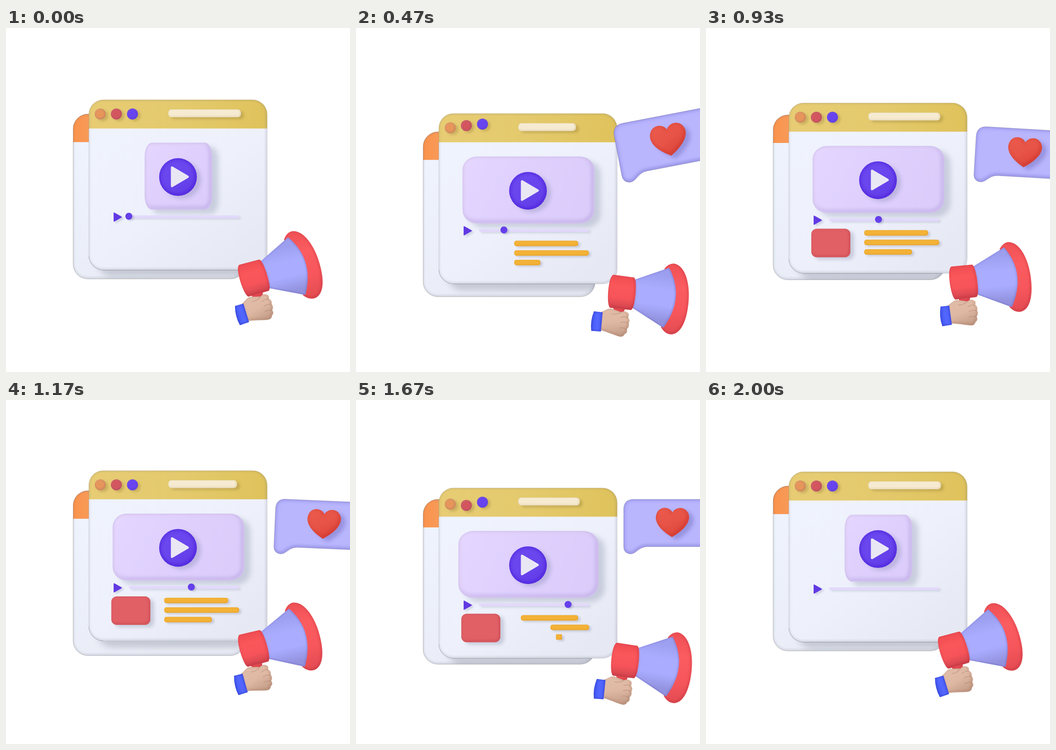
Recreate the animation shown at these times as an HTML page with a canvas. Size 748 by 748 pixels, loop 2030 ms.

```html
<!DOCTYPE html>
<html lang="en">
<head>
<meta charset="utf-8">
<style>
html, body { margin: 0; width: 100%; height: 100%; overflow: hidden; background: #fff; }
canvas { display: block; }
</style>
</head>
<body>
<canvas id="stage" width="748" height="748"></canvas>
<script>
const ctx = document.getElementById('stage').getContext('2d');
const LOOP = 2030, MOVE = 2000, FAR = 3000, { PI, sin, cos, exp, min, max } = Math;

// Motion rules
const progress = (t, from, to) => min(1, max(0, (t - from) / (to - from)));
const ramp = (t, from, to) => { const u = progress(t, from, to); return u * u * (3 - 2 * u); };
const settle = (t, from, to) => 1 - (1 - progress(t, from, to)) ** 3;
const hop = (t, start, length) => sin(PI * progress(t, start, start + length));
const spring = t => 1 - exp(-t / 165) * cos(PI * t / 320);
const bob = (t, mid, reach, lag = 0) => mid - reach * cos(2 * PI * (t - lag) / 1000);

// Key poses of the waving hand: time, x, y, angle in degrees
const wave = [
  [0, 583, 567.5, -18.5], [270, 607.5, 608, 0], [670, 608, 610, 3], [930, 600, 583, -9.2],
  [1130, 583, 566, -17], [1370, 586, 570, -11.5], [1670, 616.5, 606, 4.6], [2000, 583, 567.5, -18.5]
];

// Smooth path through the poses; returns x, y and angle.
function poseAt(t) {
  const i = max(0, wave.findIndex(p => p[0] >= t) - 1), a = wave[i], b = wave[i + 1];
  const span = b[0] - a[0], u = (t - a[0]) / span, v = 1 - u;
  const speed = (j, k) => {
    const p = wave[j - 1], n = wave[j + 1];
    return p && n ? (n[k] - p[k]) / (n[0] - p[0]) : 0;
  };
  return [1, 2, 3].map(k => a[k] * (1 + 2 * u) * v * v + b[k] * u * u * (3 - 2 * u)
    + span * u * v * (v * speed(i, k) - u * speed(i + 1, k)));
}

// Drawing helpers
function box(x, y, w, h, r) {
  const p = new Path2D();
  p.roundRect(x, y, w, h, r);
  return p;
}
function disc(x, y, r) {
  const p = new Path2D();
  p.arc(x, y, r, 0, 7);
  return p;
}
function blend(x0, y0, x1, y1, ...colors) {
  const g = ctx.createLinearGradient(x0, y0, x1, y1);
  colors.forEach((c, i) => g.addColorStop(i / (colors.length - 1), c));
  return g;
}
function group(draw) {
  ctx.save();
  draw();
  ctx.restore();
}
function shade(color, blur, dx, dy) {
  ctx.shadowColor = color;
  ctx.shadowBlur = blur;
  ctx.shadowOffsetX = dx;
  ctx.shadowOffsetY = dy;
}
function outline(path, color, width = .8) {
  ctx.lineWidth = width;
  ctx.strokeStyle = color;
  ctx.stroke(path);
}

// Soft edge inside a shape: only the shadow of an off-stage outline is seen.
function rim(path, color, size, shift) {
  group(() => {
    ctx.clip(path);
    const m = ctx.getTransform();
    m.e -= FAR;
    ctx.setTransform(m);
    shade(color, size * 1.6, FAR + shift, shift);
    outline(path, '#000', size);
  });
}
function solid(path, fill, { drop = 0, depth = 3, dark = 'rgba(60,40,110,.28)', light = 'rgba(255,255,255,.4)', cast = 'rgba(95,105,140,.25)' } = {}) {
  group(() => {
    if (drop) shade(cast, drop * .8, drop * .9, drop * .6);
    ctx.fillStyle = fill;
    ctx.fill(path);
  });
  if (!depth) return;
  rim(path, dark, depth, -depth * .4);
  rim(path, light, depth, depth * .4);
}
function triangle(x, y, w, h, fill, round) {
  const p = new Path2D(`M${x} ${y - h}L${x + w} ${y}L${x} ${y + h}Z`);
  ctx.fillStyle = fill;
  ctx.lineJoin = 'round';
  ctx.fill(p);
  outline(p, fill, round);
}

function drawWindow(path, bar, barFill, bodyFill, edge) {
  group(() => {
    ctx.clip(path);
    ctx.fillStyle = bodyFill;
    ctx.fillRect(0, 0, 748, 748);
    ctx.fillStyle = barFill;
    ctx.fillRect(0, 0, 748, bar);
  });
  rim(path, 'rgba(90,95,115,.3)', 3, -1);
  outline(path, edge);
}

function drawBack(t, front) {
  const top = bob(t, 206.6, 19.5), path = box(146, top, 374, 358.5, 32);
  drawWindow(path, top + 61, blend(146, 0, 180, 0, '#fb934c', '#f79a58'),
    blend(146, top, 330, top + 358, '#eff4ff', '#e9ecf5'), 'rgba(85,80,75,.45)');
  group(() => {
    ctx.clip(path);
    shade('rgba(95,100,120,.26)', 13, 19, 14);
    ctx.fill(box(180, front, 388, 370.5, 32));
  });
}

function drawTitleBar(t) {
  const cast = 'rgba(120,95,40,.26)';
  ['#e6955b', '#d3565f', '#6744ef'].forEach((color, i) => {
    const y = 31 + 7.5 * hop(t, 1630 - 80 * i, 200) - 8 * hop(t, 160 + 70 * i, 300);
    solid(disc(205 + 35 * i, y, 12), color, { drop: 6, depth: 2, cast, light: 'rgba(255,255,255,.12)' });
  });
  solid(box(353, 21, bob(t, 141.3, -16.5), 17, 7), '#f6ebd1', { drop: 7, depth: 2, dark: 'rgba(150,115,40,.28)', cast });
}

function drawPlayer(t) {
  const half = 73.5 + 69.5 * spring(min(t, MOVE - t));
  solid(box(375 - half, 93.5, half * 2, 145.5, { x: 31 * half / 143, y: 29 }),
    blend(375 - half, 93, 375 + half, 239, '#e4d6ff', '#decffd', '#dacbfa'),
    { drop: 15, depth: 5, dark: 'rgba(105,80,165,.4)', light: 'rgba(255,238,252,.45)' });

  const r = 41 - 5 * hop(t, 60, 400);
  solid(disc(374, 168, r), blend(345, 127, 395, 209, '#6b48ef', '#6946ed', '#613be8'),
    { drop: 10, depth: 4, dark: 'rgba(62,10,205,.5)', light: 'rgba(75,25,220,.35)' });
  group(() => {
    ctx.translate(374, 168);
    ctx.scale(r / 41, r / 41);
    triangle(-13, -.5, 34, 20, '#eae7f5', 5);
  });

  group(() => {
    shade('rgba(95,105,140,.2)', 4, 4, 3);
    triangle(235, 255, 16, 9, '#6238e6', 2);
    ctx.fillStyle = '#e3d8fc';
    ctx.fillRect(268, 251.5, 238, 5.5);
  });
  solid(disc(267 + .1162 * t, 253.3, 7.6 * (1 - ramp(t, 1900, 1990))), '#653fea', { drop: 4, depth: 0 });
}

function drawText(t) {
  [483, 507, 448].forEach((end, i) => {
    const length = end - 344, out = 1620 - 72 * i;
    const x = 344 + length * ramp(t, out, out + 250);
    const w = 344 + length * settle(t, 40 + 180 * i, 340 + 180 * i) - x;
    if (w > 3) solid(box(x, 276.5 + 20.8 * i, w, 12, min(5, w / 5)), '#f3b237',
      { drop: 5, depth: 1.5, dark: 'rgba(190,110,0,.3)', light: 'rgba(255,215,120,.15)' });
  });

  const s = ramp(t, 700, 870) - ramp(t, 1720, 1900);
  if (s > .01) solid(box(271.5 - 42.5 * s, 304.5 - 31 * s, 85 * s, 62 * s, 12 * s), '#e16066',
    { drop: 9, depth: 3, dark: 'rgba(150,25,45,.38)', light: 'rgba(255,140,140,.2)' });
}

function drawBrowser(t) {
  const top = bob(t, 172.3, 20.6, 105);
  drawBack(t, top);
  group(() => {
    ctx.translate(0, top);
    drawWindow(box(180, 0, 388, 370.5, 32), 62.5, blend(180, 0, 568, 60, '#e7cc74', '#e4ca6d', '#dfc25b'),
      blend(240, 60, 480, 371, '#eff3fd', '#eef1fb', '#e6e9f3'), 'rgba(95,85,75,.2)');
    drawTitleBar(t);
    drawPlayer(t);
    drawText(t);
  });
}

const bubble = new Path2D('M604 216H773Q795 216 795 238V298Q795 319 773 319H634C618 319 612 329 604 333Q596 337 588 332Q582 328 582 318V238Q582 216 604 216Z');
const heart = new Path2D('M688 245C682 231 656 229 652 253C650 273 672 289 687 298C703 289 727 271 724 251C719 230 695 231 688 245Z');

function drawBubble(t) {
  const s = (ramp(t, 40, 260) - ramp(t, 1720, 1900)) * (1 + .18 * exp((270 - t) / 270));
  if (s < .01) return;
  group(() => {
    ctx.translate(598, 333);
    ctx.rotate((-11 + 14.5 * ramp(t, 440, 960) - 3.5 * ramp(t, 960, 1560)) * PI / 180);
    ctx.scale(s, s);
    ctx.translate(-598, -333);
    solid(bubble, '#b9b6fe', { depth: 4, dark: 'rgba(75,70,165,.4)', light: 'rgba(130,125,220,.25)' });
    outline(bubble, 'rgba(75,70,120,.4)');
    solid(heart, blend(670, 235, 705, 298, '#ea5a4c', '#e75347', '#da4238'),
      { drop: 11, depth: 4, dark: 'rgba(175,25,20,.38)', light: 'rgba(255,120,95,.15)', cast: 'rgba(85,80,165,.34)' });
  });
}

const bell = new Path2D('M662 513Q671 501 682 501C708 504 720 545 719 582C718 626 706 653 686 655Q672 655 663 641Z');
const cone = new Path2D('M598 542L672 511Q711 574 668 642L598 603Q608 572 598 542Z');
const barrel = new Path2D('M552 534L597 537Q603 540 603 571Q602 606 595 608L549 606Q543 600 543 570Q544 538 552 534Z');
const grip = new Path2D('M556 602H583L580 613Q568 618 558 612Z');
const cuff = new Path2D('M515 616L534 617L533 659L512 659Q508 638 515 616Z');
const fist = new Path2D('M531 616C540 613 545 606 554 608L574 614Q583 610 588 614Q594 618 590 624Q596 631 592 637Q595 645 589 650Q592 658 585 661Q582 669 573 667C560 664 548 659 531 656Z');
const fingers = new Path2D('M590 625Q580 622 574 626M592 638Q582 633 574 637M589 651Q580 646 572 649M574 614Q566 621 553 619');

function drawHorn(t) {
  const [x, y, angle] = poseAt(t);
  const red = { depth: 3, dark: 'rgba(150,20,40,.36)', light: 'rgba(255,120,115,.2)' };
  group(() => {
    ctx.translate(x, y);
    ctx.rotate(angle * PI / 180);
    ctx.translate(-607.5, -608);
    solid(bell, blend(690, 501, 695, 655, '#ee5055', '#fb5c60', '#f7575c', '#e24b52'), red);
    solid(cone, blend(640, 525, 632, 625, '#9c9eee', '#aaadff', '#a9acff', '#9292de'),
      { depth: 2, dark: 'rgba(65,60,150,.3)', light: 'rgba(120,120,215,.2)' });
    solid(grip, '#e84c52', red);
    solid(barrel, blend(570, 534, 568, 608, '#ef4c52', '#fa575b', '#f6545a', '#cf434d'), red);
    solid(fist, blend(550, 608, 562, 667, '#e0bda9', '#dfb8a3', '#c49d88'),
      { dark: 'rgba(120,70,50,.32)', light: 'rgba(255,225,205,.2)' });
    outline(fingers, 'rgba(150,105,85,.4)', 1.3);
    solid(cuff, blend(512, 0, 534, 0, '#4358f0', '#5468ff', '#4a5ef8'),
      { depth: 2, dark: 'rgba(25,30,150,.35)', light: 'rgba(40,50,180,.25)' });
  });
}

let begin;
function frame(now) {
  begin ??= now;
  const t = min((now - begin) % LOOP, MOVE);
  ctx.clearRect(0, 0, 748, 748);
  drawBrowser(t);
  drawBubble(t);
  drawHorn(t);
  requestAnimationFrame(frame);
}
requestAnimationFrame(frame);
</script>
</body>
</html>
```
